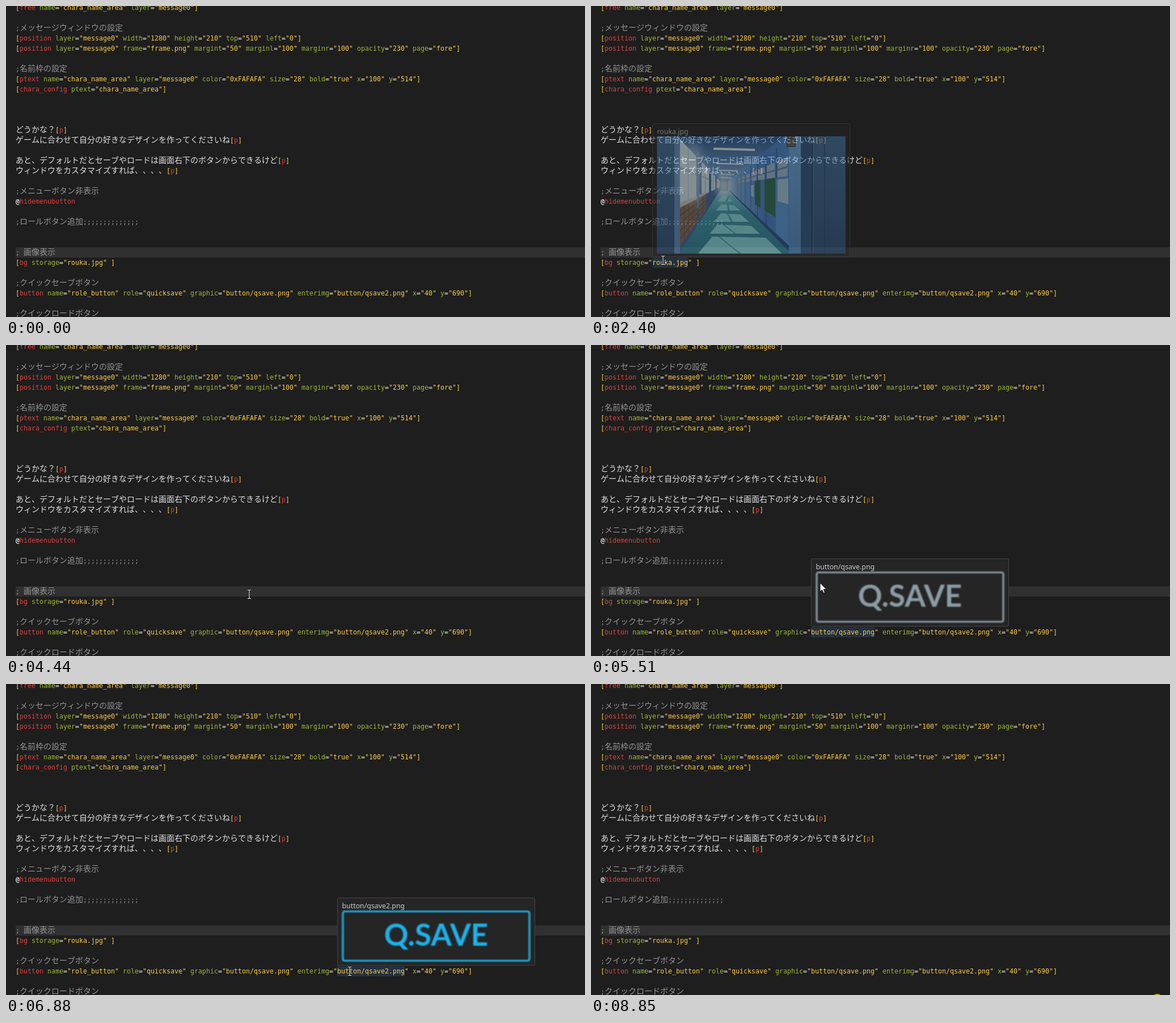
An HTML page for the animation above (8920 ms loop, 1021 px wide and 549 px high).

```html
<!DOCTYPE html>
<html lang="ja">
<head>
<meta charset="utf-8">
<title>Image preview on hover</title>
<style>
  html, body { margin: 0; width: 100%; height: 100%; overflow: hidden; background: #1e1e1e; }
  svg { display: block; }
  .code { font: 11.63px "DejaVu Sans Mono", "Noto Sans Mono", monospace; fill: #e0e0e0; }
  .wide { font: 14px "Noto Sans Mono CJK JP", "Noto Sans CJK JP", sans-serif; text-spacing-trim: space-all; }
  .comment { fill: #949494; }
  .bracket { fill: #ffd24a; }
  .tag { fill: #d8433f; }
  .attr { fill: #9cb53b; }
  .string { fill: #fbcb48; }
  .at { font-weight: 700; }
  .title { font: 12.35px "Noto Sans", "Open Sans", sans-serif; fill: #cccccc; }
  .label { font: 700 53px Lato, sans-serif; text-anchor: middle; }
</style>
</head>
<body>
<svg id="stage" width="1021" height="549" viewBox="0 0 1021 549">
  <defs>
    <filter id="soft" x="-5%" y="-10%" width="110%" height="120%"><feGaussianBlur stdDeviation="0.8"/></filter>
    <filter id="haze" x="-60%" y="-60%" width="220%" height="220%"><feGaussianBlur stdDeviation="7"/></filter>
    <linearGradient id="ceiling" x1="0" y1="0" x2="0" y2="1">
      <stop offset="0" stop-color="#2b5b96"/><stop offset="1" stop-color="#78b0e4"/>
    </linearGradient>
    <linearGradient id="floor" x1="0" y1="0" x2="0" y2="1">
      <stop offset="0" stop-color="#86d6e6"/><stop offset="0.35" stop-color="#3c9db2"/><stop offset="1" stop-color="#2b869e"/>
    </linearGradient>
    <linearGradient id="wall">
      <stop offset="0" stop-color="#8cc0ee"/><stop offset="0.5" stop-color="#4584d0"/><stop offset="1" stop-color="#4e93dc"/>
    </linearGradient>
    <linearGradient id="pillar" x1="0" y1="0" x2="0" y2="1">
      <stop offset="0" stop-color="#41729f"/><stop offset="1" stop-color="#2e557f"/>
    </linearGradient>
    <linearGradient id="column" x1="0" y1="0" x2="0" y2="1">
      <stop offset="0" stop-color="#6fb0ea"/><stop offset="1" stop-color="#5490cf"/>
    </linearGradient>
    <clipPath id="photo"><rect x="116.5" y="230" width="332" height="207"/></clipPath>
  </defs>
</svg>
<script>
const LOOP = 8920, STEP = 70;
const CHAR = 7, ROW = 18, LEFT = 17, BASELINE = 7;
const stage = document.getElementById('stage');

function add(parent, name, attrs = {}, text) {
  const node = document.createElementNS('http://www.w3.org/2000/svg', name);
  for (const key in attrs) node.setAttribute(key, attrs[key]);
  if (text !== undefined) node.textContent = text;
  parent.append(node);
  return node;
}
const box = (parent, x, y, width, height, fill, more) =>
  add(parent, 'rect', { x, y, width, height, fill, ...more });
const poly = (parent, points, fill, more) =>
  add(parent, 'polygon', { points, fill, ...more });

// Code listing, keyed by row
const listing = {
  0: '[free name="chara_name_area" layer="message0"]',
  2: ';メッセージウィンドウの設定',
  3: '[position layer="message0" width="1280" height="210" top="510" left="0"]',
  4: '[position layer="message0" frame="frame.png" margint="50" marginl="100" marginr="100" opacity="230" page="fore"]',
  6: ';名前枠の設定',
  7: '[ptext name="chara_name_area" layer="message0" color="0xFAFAFA" size="28" bold="true" x="100" y="514"]',
  8: '[chara_config ptext="chara_name_area"]',
  12: 'どうかな？[p]',
  13: 'ゲームに合わせて自分の好きなデザインを作ってくださいね[p]',
  15: 'あと、デフォルトだとセーブやロードは画面右下のボタンからできるけど[p]',
  16: 'ウィンドウをカスタマイズすれば、、、、[p]',
  18: ';メニューボタン非表示',
  19: '@hidemenubutton',
  21: ';ロールボタン追加;;;;;;;;;;;;;;',
  24: '; 画像表示',
  25: '[bg storage="rouka.jpg" ]',
  27: ';クイックセーブボタン',
  28: '[button name="role_button" role="quicksave" graphic="button/qsave.png" enterimg="button/qsave2.png" x="40" y="690"]',
  30: ';クイックロードボタン'
};
const TOKEN = /(?<=[\[@])\w+|[\[\]]|"[^"]*"|\w+(?==)|@|[^\[\]"@\w]+/g;
const SCRIPT_RUN = /[\x00-\x7f]+|[^\x00-\x7f]+/g;
const isWide = text => text > '\x7f';

function kindOf(token, before) {
  if (/[\[\]]/.test(token)) return 'bracket';
  if (token[0] === '"') return 'string';
  if (token === '@') return 'at';
  if (/^\w/.test(token)) return /[\[@]/.test(before) ? 'tag' : 'attr';
  return 'plain';
}

function drawLine(row, line) {
  const text = add(stage, 'text', { class: 'code', y: BASELINE + ROW * row });
  const comment = line[0] === ';';
  let column = 0, before = '';
  for (const token of line.match(comment ? SCRIPT_RUN : TOKEN)) {
    const wide = isWide(token);
    const kind = (comment ? 'comment' : kindOf(token, before)) + (wide ? ' wide' : '');
    if (token !== ' ') add(text, 'tspan', { x: LEFT + CHAR * column, class: kind }, token);
    column += token.length * (wide ? 2 : 1);
    before = token;
  }
}

box(stage, LEFT, 426, 1004, ROW, '#303030');
const marks = add(stage, 'g');
for (const row in listing) drawLine(+row, listing[row]);

// School corridor in one-point perspective; k is the slope of an edge from the vanishing point
function drawCorridor(parent) {
  const g = add(parent, 'g', { 'clip-path': 'url(#photo)' });
  const VX = 234, VY = 316;
  const panel = (x1, x2, k1, k2, fill, more) => {
    const at = (x, k) => `${x},${VY + Math.abs(x - VX) * k} `;
    return poly(g, at(x1, k1) + at(x2, k1) + at(x2, k2) + at(x1, k2), fill, more);
  };
  box(g, 116, 230, 333, 207, '#3a6ea8');
  poly(g, '140,230 349,230 244,305 226,305', 'url(#ceiling)');
  poly(g, '228,326 242,326 372,437 140,437', 'url(#floor)');

  // Left side: windows, posts and lockers
  panel(147, 228, -1.05, 1.55, '#3c6ea6');
  [[157, 186], [195, 208], [212, 219], [222, 227]].forEach(([a, b]) => {
    panel(a, b, -1.05, 0.5, '#dcf3fb');
    panel(a, b, -0.42, -0.36, '#8fb9dc');
    panel((a + b) / 2 - 0.7, (a + b) / 2 + 0.7, -1.05, 0.5, '#9cc4e2');
  });
  [[157, 187], [190, 203]].forEach(([a, b]) => {
    panel(a, b, 0.48, 1.4, '#8a705c');
    panel(a, b, 0.4, 0.52, '#d8cfc2');
    for (let k = 0.68; k < 1.4; k += 0.18) panel(a, b, k, k + 0.03, '#5e4e46');
    for (let x = a + 7; x < b; x += 8) panel(x, x + 1, 0.52, 1.4, '#6b564b');
  });
  panel(187, 191, -1.3, 0.9, '#5f92cb');

  // Right side: wall, upper windows, boards and doors
  poly(g, '242,308 340,230 372,230 372,437 349,433 242,326', 'url(#wall)');
  for (let i = 0, x = 349; i < 7; i++) {
    const next = VX + (x - VX) * 0.8;
    const gap = (x - next) * 0.1;
    panel(next + gap, x - gap, -0.44, -0.14, '#a0c2dd');
    panel(next + gap, x - gap, -0.3, -0.27, '#5d88b8');
    panel(next, next + gap, -0.7, 0.95, '#3467a6');
    x = next;
  }
  panel(326, 348, -0.12, 0.93, '#5a9de4');
  panel(329, 348, -0.1, 0.3, '#a8d0ea');
  panel(306, 325, -0.14, 0.62, '#2f7056');
  panel(289, 299, -0.14, 0.62, '#2f7056');
  panel(282, 287, 0, 0.4, '#a4d0ec');
  panel(244, 349, 0.93, 1.02, '#25568c');

  // Sunlight on the floor
  [[334, 345, 226, 246], [350, 361, 223, 259], [366, 381, 220, 273], [386, 402, 213, 292], [407, 437, 196, 326]]
    .forEach(([top, bottom, a, b]) => {
      const lean = (bottom - top) * 0.6;
      poly(g, `${a + lean},${top} ${b - lean},${top + 2} ${b + lean * 0.6},${bottom} ${a - lean * 0.4},${bottom}`, '#8be6ec');
      poly(g, `${a + lean + 10},${top} ${a + lean + 13},${top} ${(a + b) / 2 + 4},${bottom} ${(a + b) / 2},${bottom}`, '#48b0c0');
    });
  // Ceiling lights
  [[216, 289, 252, 4], [221, 269, 278, 2.4], [225, 259, 290, 2], [227, 253, 297, 1.6], [229, 249, 303, 1.4]]
    .forEach(([a, b, y, h]) => poly(g, `${a},${y - h / 2} ${b},${y} ${b},${y + h} ${a},${y + h / 2}`, '#f0f9ff'));

  // Foreground columns and the glare from the windows
  box(g, 116, 230, 32, 207, 'url(#pillar)');
  box(g, 147, 230, 10, 207, '#6093c8');
  box(g, 349, 230, 21, 207, 'url(#column)');
  box(g, 370, 230, 79, 207, 'url(#pillar)');
  box(g, 370, 230, 18, 207, '#2f5988');
  box(g, 389, 230, 2, 207, '#1d3a5e');
  box(g, 391, 230, 1, 207, '#5b7f9e');
  box(g, 411, 230, 1.5, 207, '#264a74');
  box(g, 345, 230, 16, 19, '#4b4d50');
  box(g, 347, 235, 12, 12, '#6b675f');
  const glare = (cx, cy, rx, ry, opacity) =>
    add(g, 'ellipse', { cx, cy, rx, ry, opacity, fill: '#e4faff', filter: 'url(#haze)' });
  glare(234, 318, 13, 18, 0.85);
  glare(178, 295, 24, 55, 0.4);
}

function drawButton(parent, x, color) {
  const g = add(parent, 'g', { filter: 'url(#soft)' });
  box(g, x + 10, 401.5, 329, 87, 'none', { stroke: color, 'stroke-width': 3.2, rx: 3 });
  add(g, 'text', { class: 'label', x: x + 174.5, y: 462, fill: color }, 'Q.SAVE');
}

const previews = [
  { x: 108, y: 207, h: 236, word: 63, start: 2260, end: 3550, name: 'rouka.jpg', draw: drawCorridor },
  { x: 388, y: 377, h: 120, word: 112, start: 5040, end: 5800, name: 'button/qsave.png', draw: g => drawButton(g, 388, '#8c9ca5') },
  { x: 584, y: 377, h: 120, word: 119, start: 6670, end: 7750, name: 'button/qsave2.png', draw: g => drawButton(g, 584, '#1eb3ea') }
];
for (const p of previews) {
  p.mark = box(marks, p.x, p.y + p.h + 1, p.word, ROW, '#243140');
  p.group = add(stage, 'g');
  box(p.group, p.x + 0.5, p.y + 0.5, 348, p.h - 1, '#252526', { stroke: '#454545', rx: 2 });
  add(p.group, 'text', { class: 'title', x: p.x + 8.5, y: p.y + 19 }, p.name);
  p.draw(p.group);
}

const glow = add(stage, 'circle', { cx: 998.5, cy: 557, r: 10, fill: '#c4ae12' });

// Pointers, both with the hot spot at the origin
const beam = add(stage, 'g', { fill: 'none' });
for (const [stroke, width] of [['#111', 2.4], ['#f4f4f4', 1.1]])
  add(beam, 'path', { d: 'M-3-7.5H-1L0-7L1-7.5H3M0-7V7M-3 7.5H-1L0 7L1 7.5H3', stroke, 'stroke-width': width });
const arrow = add(stage, 'path', {
  d: 'M0 0V15.5L3.6 12.2L6 18L8.4 17L6 11.3H11Z', fill: '#fff', stroke: '#111', 'stroke-width': 0.9
});

// Pointer keys: time, x, y, and whether the move into the key is eased
const path = [
  [190, 987, 482], [400, 905, 309], [530, 905, 309], [1440, 167.5, 421, true],
  [1500, 167.5, 421], [2060, 127, 445, true], [2260, 127, 445], [2400, 127, 449],
  [3060, 127, 449], [3270, 210, 452], [3620, 290, 450], [4020, 343.5, 427],
  [4440, 429, 440], [4780, 439, 505], [5250, 439, 505], [5510, 404, 420],
  [5650, 450, 345], [5790, 560, 341], [5930, 609, 442], [6480, 606, 507, true],
  [7540, 606, 507], [7680, 575, 410], [7820, 690, 274], [7960, 951.5, 391],
  [8100, 951.5, 391], [8590, 1008, 560]
];

function pointerAt(t) {
  if (t < path[0][0]) return null;
  const i = path.findIndex(key => key[0] > t);
  if (i < 0) return null;
  const [t0, x0, y0] = path[i - 1], [t1, x1, y1, eased] = path[i];
  let u = Math.floor((t - t0) / STEP) * STEP / (t1 - t0);
  if (eased) u = u * u * (3 - 2 * u);
  return { x: x0 + (x1 - x0) * u, y: y0 + (y1 - y0) * u };
}

const FADE = [0, 0.25, 0.52, 1];
const show = (node, on) => node.setAttribute('visibility', on ? 'visible' : 'hidden');

function render(t) {
  const pointer = pointerAt(t);
  let over = false;
  for (const p of previews) {
    const on = t >= p.start && t < p.end;
    show(p.mark, on);
    show(p.group, on);
    if (!on) continue;
    p.group.setAttribute('opacity', FADE[Math.min(3, Math.floor((t - p.start) / STEP))]);
    over ||= pointer && pointer.x > p.x && pointer.x < p.x + 349 && pointer.y > p.y && pointer.y < p.y + p.h;
  }
  show(beam, pointer && !over);
  show(arrow, pointer && over);
  if (pointer) {
    const move = `translate(${Math.round(pointer.x)} ${Math.round(pointer.y)})`;
    beam.setAttribute('transform', move);
    arrow.setAttribute('transform', move);
  }
  show(glow, t >= 8850);
}

function tick() {
  render(performance.now() % LOOP);
  requestAnimationFrame(tick);
}
tick();
</script>
</body>
</html>
```
